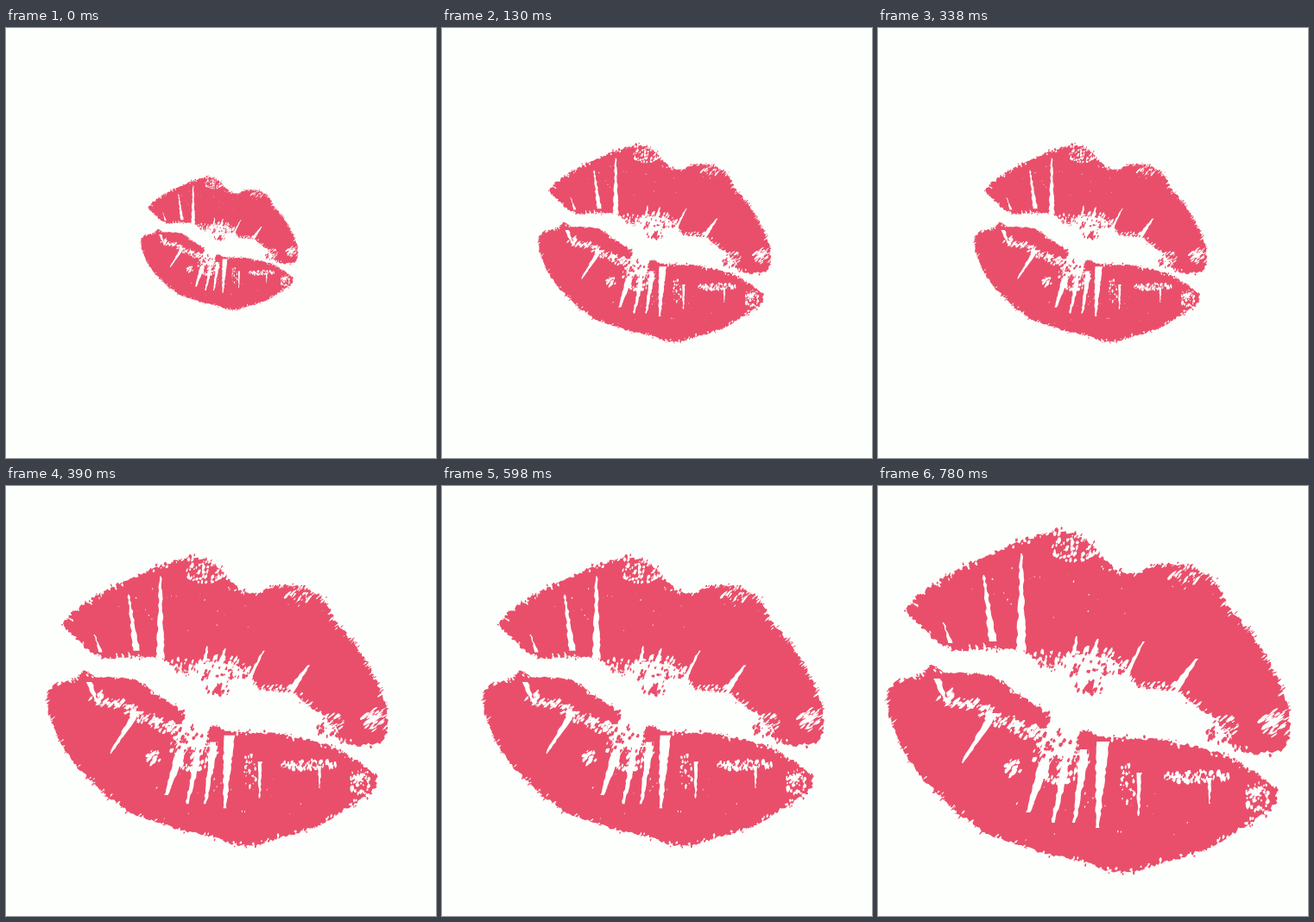
These frames come from a looping animation (498 by 498 pixels, 910 ms). An HTML page:

```html
<!DOCTYPE html>
<html lang="en">
<head>
<meta charset="utf-8">
<title>Kiss print</title>
<style>
  html, body { margin: 0; width: 100%; height: 100%; overflow: hidden; background: #fdfffc; }
  svg { display: block; width: 498px; height: 498px; }
</style>
</head>
<body>
<svg viewBox="0 0 498 498">
  <g id="kiss">
    <path id="lips" fill="#e94f6b"/>
    <path id="gaps" fill="#fdfffc"/>
    <path id="flecks" fill="#e94f6b"/>
  </g>
</svg>
<script>
const LOOP = 910, CENTER = 249.2;
const STEPS = [[650, 1], [390, 0.8455], [130, 0.577], [0, 0.39]];

let seed = 41;
const rand = () => {
  seed = (seed * 1664525 + 1013904223) % 4294967296;
  return seed / 4294967296;
};
const jitter = a => (rand() * 2 - 1) * a;
const repeat = (n, make) => Array.from({ length: n }, (_, i) => make(i));
const toPath = pts => 'M' + pts.map(p => p[0].toFixed(1) + ' ' + p[1].toFixed(1)).join('L') + 'Z';

// Closed Catmull-Rom curve through "x,y" key points
function curve(s) {
  const keys = s.trim().split(/\s+/).map(p => p.split(',').map(Number));
  const at = i => keys[(i + keys.length) % keys.length];
  return keys.flatMap((b, i) => {
    const a = at(i - 1), c = at(i + 1), d = at(i + 2);
    const n = Math.ceil(Math.hypot(c[0] - b[0], c[1] - b[1]) / 2.6);
    return repeat(n, k => {
      const t = k / n;
      return [0, 1].map(j => b[j] + t / 2 * (c[j] - a[j] +
        t * (2 * a[j] - 5 * b[j] + 4 * c[j] - d[j] + t * (3 * (b[j] - c[j]) + d[j] - a[j]))));
    });
  });
}
const torn = (pts, a) => toPath(pts.map(([x, y]) => [x + jitter(a), y + jitter(a)]));

// Creases fan out from the middle of each lip
const upperLean = x => 0.0042 * (166 - x);
const lowerLean = x => Math.min(0, 0.0045 * (x - 262) - 0.05);
const leanAt = (x, y) => y < 215 + x * 0.18 ? upperLean(x) : lowerLean(x);

// Tapering crease; a negative length runs upwards
function crease([x, y, len, width]) {
  const lean = leanAt(x, y), n = Math.ceil(Math.abs(len) / 4);
  const side = dir => repeat(n + 1, i => {
    const f = i / n;
    return [x + lean * len * f + dir * width / 2 * (1 - 0.75 * f) + jitter(1), y + len * f];
  });
  const [a, b] = len > 0 ? [1, -1] : [-1, 1];
  return toPath(side(a).concat(side(b).reverse()));
}

// Small ragged spot, stretched along the crease direction
function fleck(x, y, r) {
  const lean = leanAt(x, y), stretch = 1 + rand();
  return toPath(repeat(7, i => {
    const a = i * Math.PI * 2 / 7, d = r * (0.5 + rand() * 0.7);
    const v = Math.sin(a) * d * stretch;
    return [x + Math.cos(a) * d + lean * v, y + v];
  }));
}

const cloud = ([x, y, rx, ry, count, size = 2.6]) => repeat(count, () => {
  const a = rand() * Math.PI * 2, d = Math.sqrt(rand());
  return fleck(x + Math.cos(a) * d * rx, y + Math.sin(a) * d * ry, size * (0.35 + rand() * 0.65));
}).join('');

const edgeFlecks = (pts, count, spread, size) => repeat(count, () => {
  const [x, y] = pts[Math.floor(rand() * pts.length)];
  return fleck(x + jitter(spread), y + jitter(spread), size * (0.4 + rand() * 0.6));
}).join('');

const upper = curve(`34,143 66,113 103,92 150,70 185,57 215,53 245,65 275,95 297,100 325,91
  360,92 388,108 405,138 438,178 462,222 474,255 474,298 448,310 412,303 402,280 365,252
  345,238 300,231 280,205 225,195 200,211 168,192 120,188 85,190 55,168`);
const lower = curve(`10,246 25,225 48,220 62,207 80,217 108,217 138,223 166,243 200,268 188,286
  195,308 225,316 232,290 240,282 260,290 333,295 392,309 422,323 460,351 455,373 415,400
  380,420 341,433 285,447 235,435 185,423 132,404 100,384 73,361 45,330 25,298`);

const creases = [
  [166, 196, -118, 11], [133, 180, -77, 9], [84, 182, -24, 4], [224, 202, -28, 7],
  [246, 204, -27, 9], [286, 222, -42, 8], [340, 240, -40, 13],
  [68, 223, 28, 9], [134, 263, 58, 11], [200, 300, 78, 18], [221, 310, 80, 12],
  [240, 305, 85, 12], [260, 296, 100, 15], [302, 332, 50, 7], [384, 338, 30, 5]
];
const worn = [
  [228, 73, 28, 15, 55], [360, 101, 28, 10, 35], [458, 275, 14, 15, 36, 3.5],
  [252, 203, 36, 15, 60, 3.2], [195, 201, 20, 9, 26], [325, 234, 28, 7, 28],
  [400, 280, 18, 13, 26], [212, 318, 34, 28, 75, 3.2], [155, 326, 10, 11, 20, 3.2],
  [370, 337, 42, 6, 60, 3.2], [438, 358, 16, 20, 42, 3], [288, 345, 10, 24, 26],
  [240, 120, 150, 35, 30, 1], [240, 380, 140, 35, 25, 1]
];
const islands = [
  [250, 212, 38, 12, 36], [246, 234, 20, 8, 18], [395, 287, 18, 15, 26],
  [215, 305, 32, 24, 40, 3], [370, 337, 42, 5, 14]
];

// Worn band below the inner fold of the lower lip
const fold = repeat(13, i => cloud([80 + i * 9, 244 + i * 3.2 + i * i * 0.06, 10, 9, 9, 3])).join('');

const set = (id, d) => document.getElementById(id).setAttribute('d', d);
set('lips', torn(upper, 2.1) + torn(lower, 1.9));
set('gaps', creases.map(crease).join('') + worn.map(cloud).join('') + fold +
  edgeFlecks(upper, 240, 5, 2.3) + edgeFlecks(lower, 170, 4, 2));
set('flecks', fleck(245, 234, 6) + islands.map(cloud).join('') +
  edgeFlecks(upper, 130, 3.5, 1.8) + edgeFlecks(lower, 110, 3, 1.7));

const kiss = document.getElementById('kiss');
function draw(ms) {
  const t = ms % LOOP;
  const scale = STEPS.find(s => t >= s[0])[1];
  const shift = CENTER * (1 - scale);
  kiss.setAttribute('transform', `translate(${shift} ${shift}) scale(${scale})`);
}
function tick() {
  draw(performance.now());
  requestAnimationFrame(tick);
}
draw(0);
requestAnimationFrame(tick);
</script>
</body>
</html>
```
